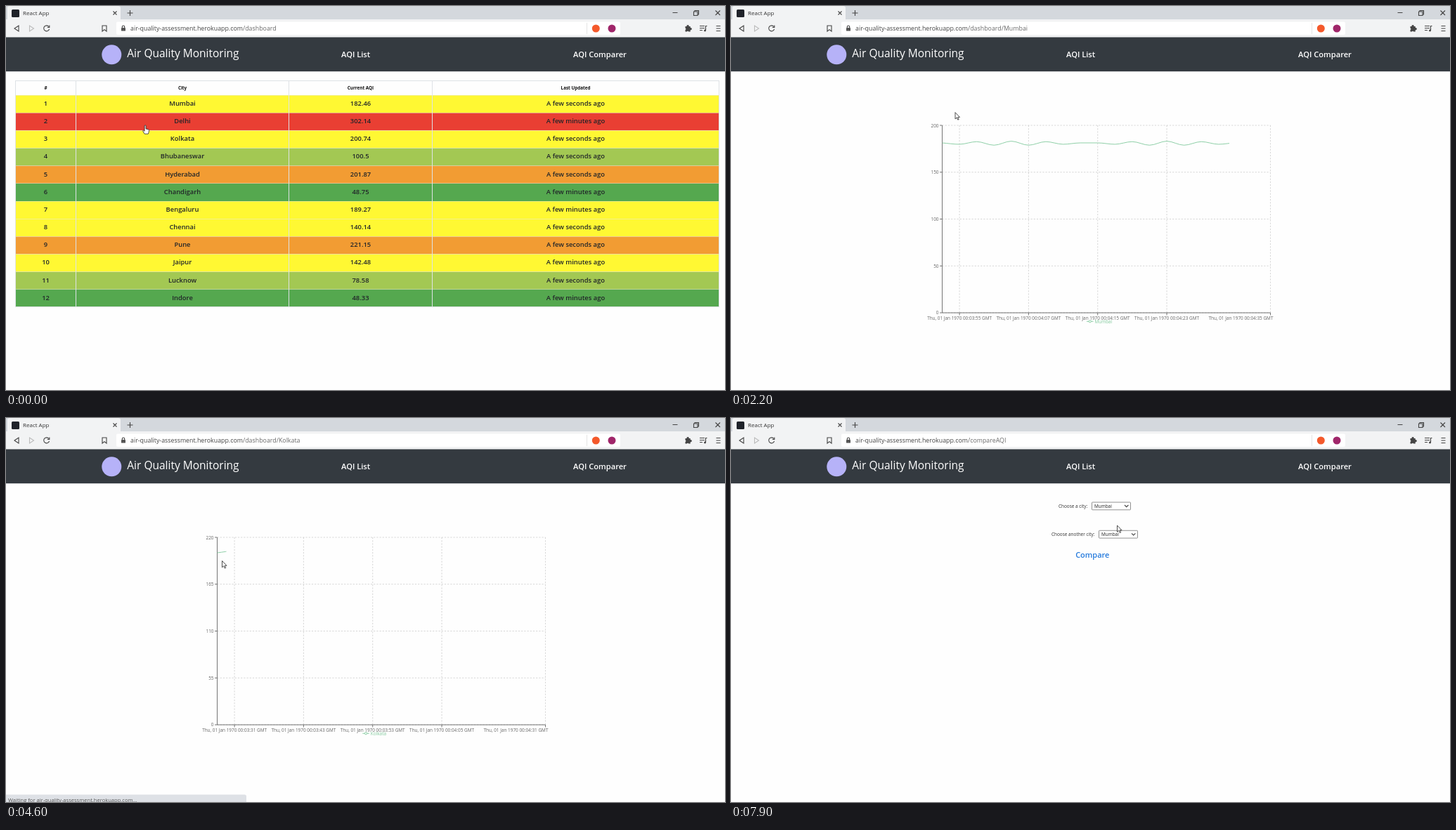
Recreate the animation shown at these times as an HTML page. Size 1023 by 547 pixels, loop 8 s.

```html
<!DOCTYPE html>
<html lang="en">
<head>
<meta charset="utf-8">
<title>Air Quality Monitoring</title>
<style>
html, body { margin: 0; width: 100%; height: 100%; overflow: hidden; background: #fefefe; }
svg { display: block; width: 1023px; height: 547px; font-family: "Open Sans", "Noto Sans", sans-serif; }
.icon { fill: none; stroke: #444; stroke-width: 1.1; }
.small { font-size: 6.42px; }
.mid { text-anchor: middle; }
.cell { font-size: 9.4px; font-weight: 600; fill: #212529; text-anchor: middle; }
.head { font-size: 6.3px; font-weight: 700; fill: #111; text-anchor: middle; }
.nav { font-size: 11.15px; font-weight: 600; fill: #fff; }
.border { fill: none; stroke: #dee2e6; shape-rendering: crispEdges; }
.rule { stroke: #dee2e6; stroke-opacity: .4; shape-rendering: crispEdges; }
.tick { fill: #666; }
.grid { stroke: #ccc; stroke-width: .8; stroke-dasharray: 2.2 2; }
.axis { stroke: #666; stroke-width: .9; }
.guide { stroke: #ccc; }
.series { fill: none; stroke: #82ca9d; stroke-width: .9; }
.dot { fill: #fff; stroke: #82ca9d; stroke-width: .9; }
.select { fill: #fff; stroke: #767676; stroke-width: .8; }
.pointer { fill: #fff; stroke: #222; stroke-width: .8; }
</style>
</head>
<body>
<svg viewBox="0 0 1023 547">
  <defs>
    <clipPath id="reveal"><rect id="sweep" x="300" y="160" width="0" height="290"/></clipPath>
  </defs>
  <rect width="1023" height="547" fill="#fefefe"/>

  <g id="browser">
    <rect width="1023" height="19.5" fill="#d4d8dd"/>
    <rect y="19" width="1023" height="26" fill="#f2f3f4"/>
    <path d="M2 20V3q0-3 3-3H160q3 0 3 3V20z" fill="#f2f3f4"/>
    <rect x="8" y="5" width="11" height="11" rx="1.5" fill="#20232a"/>
    <text x="24" y="13" font-size="8" fill="#333">React App</text>
    <path class="icon" d="M152.500 7.500l5 5m0-5l-5 5M172.500 10h8m-4-4v8"/>
    <path class="icon" d="M948.500 9.500h7M978.500 8h5.500v5.500h-5.500zM980 8V6.500h5.500V12H984M1009.500 6.500l6.500 6.500m0-6.500l-6.500 6.500"/>
    <path class="icon" d="M18 28v8l-6-4z"/>
    <path class="icon" d="M33.500 28v8l6-4z" style="stroke:#bbb"/>
    <path class="icon" d="M61 29.500a4 4 0 1 0 .6 3.400M61.800 27.500v3h-3"/>
    <path class="icon" d="M137 28h6v8l-3-2.400-3 2.400z"/>
    <rect x="157" y="22.500" width="717" height="18.500" rx="2" fill="#fff"/>
    <path d="M826.500 24v16" stroke="#ddd" stroke-width=".8"/>
    <rect x="164" y="31" width="6" height="4.500" rx=".6" fill="#555"/>
    <path class="icon" d="M165.300 31v-1.300a1.700 1.700 0 0 1 3.400 0V31"/>
    <text x="177" y="35" font-size="8.84" fill="#444">air-quality-assessment.herokuapp.com<tspan id="path" fill="#6a6a6a"></tspan></text>
    <circle cx="839.300" cy="32" r="5.500" fill="#f4592b"/>
    <circle cx="862" cy="32" r="5.500" fill="#a0266a"/>
    <path d="M966.500 29h2.200a1.500 1.500 0 1 1 2.800 0h2.200v2.200a1.500 1.500 0 1 1 0 2.800v2.500h-2.500a1.300 1.300 0 0 0-2.400 0h-2.300V34a1.400 1.400 0 0 0 0-2.600z" fill="#444"/>
    <path class="icon" d="M987 28.500h7M987 31.500h7M987 34.500h4M995.500 35v-6.500h2"/>
    <circle cx="994.500" cy="35" r="1.400" fill="#444"/>
    <path class="icon" d="M1010.500 28.500h6M1010.500 32h6M1010.500 35.500h6"/>
  </g>

  <rect y="44.500" width="1023" height="48.700" fill="#343a40"/>
  <circle cx="150.300" cy="69.300" r="14" fill="#b6b2f8"/>
  <text x="172.300" y="72.800" font-size="15.5" fill="#fff">Air Quality Monitoring</text>
  <text x="477" y="73" class="nav">AQI List</text>
  <text x="807" y="73" class="nav">AQI Comparer</text>

  <g id="pages"></g>

  <g id="status">
    <path d="M0 536.500H339.500q2.500 0 2.500 2.500V547H0z" fill="#dee1e6"/>
    <text id="statusText" x="3" y="546.800" font-size="7.57" fill="#555"></text>
  </g>
  <path id="arrow" class="pointer" d="M0 0V9.300L2.200 7.300 3.800 10.600 5.200 9.900 3.700 6.800H6.500z"/>
  <path id="hand" class="pointer" d="M-.9 1q0-1.200 1-1.200t1 1.200V5l3.300.8q1.200.4 1.100 1.700L5 10.200 4.300 12.200H-.8L-3 8.700q-.8-1.300.2-1.500.8-.1 1.900 1.200z"/>
</svg>

<script>
const LOOP = 8000, STEP = 100;
const HOST = "air-quality-assessment.herokuapp.com";
const $ = id => document.getElementById(id);

function add(parent, tag, attrs, text = "") {
  const el = document.createElementNS("http://www.w3.org/2000/svg", tag);
  for (const k in attrs) el.setAttribute(k, attrs[k]);
  el.textContent = text;
  parent.appendChild(el);
  return el;
}
const newPage = () => add($("pages"), "g");
const label = (parent, x, y, cls, text, extra) => add(parent, "text", { x, y, class: cls, ...extra }, text);
const line = (parent, x1, y1, x2, y2, cls) => add(parent, "line", { x1, y1, x2, y2, class: cls });
const show = (el, on) => el.setAttribute("visibility", on ? "visible" : "hidden");
const move = (el, x, y) => el.setAttribute("transform", `translate(${x} ${y})`);
const smooth = u => u * u * (3 - 2 * u);

// Interpolates rows of [position, ...values]
function along(points, x, shape = u => u) {
  const i = Math.max(1, points.findIndex(p => p[0] >= x));
  const [a, ...from] = points[i - 1], [b, ...to] = points[i];
  const u = shape((x - a) / (b - a));
  return from.map((v, j) => v + (to[j] - v) * u);
}

// Table: one reading, or the readings before and after the update
const readings = {
  Mumbai: [182.46, 180.16], Delhi: [302.14, 303.77], Kolkata: [200.74], Bhubaneswar: [100.5, 99.06],
  Hyderabad: [201.87, 199.16], Chandigarh: [48.75], Bengaluru: [189.27], Chennai: [140.14],
  Pune: [221.15, 219.64], Jaipur: [142.48], Lucknow: [78.58], Indore: [48.33]
};
const recent = ["Mumbai Kolkata Bhubaneswar Hyderabad Chennai Pune Lucknow", "Kolkata Hyderabad Chennai Lucknow"];
const edges = [13.5, 99.5, 402.5, 606.5, 1014.5];
const center = i => (edges[i] + edges[i + 1]) / 2;
const color = aqi => aqi < 51 ? "#55a84f" : aqi < 101 ? "#a3c853" : aqi < 201 ? "#fff833" : aqi < 301 ? "#f29c33" : "#e93f33";

function makeTable(version) {
  const g = newPage(), top = 127, height = 25.17;
  ["#", "City", "Current AQI", "Last Updated"].forEach((s, c) => label(g, center(c), 119, "head", s));
  Object.keys(readings).forEach((city, i) => {
    const y = top + i * height, aqi = readings[city][version] ?? readings[city][0];
    const unit = recent[version].includes(city) ? "seconds" : "minutes";
    add(g, "rect", { x: 13.5, y, width: 1001, height, fill: color(aqi) });
    [i + 1, city, aqi, `A few ${unit} ago`].forEach((s, c) => label(g, center(c), y + 14.9, "cell", s));
    line(g, 14, Math.floor(y) + .5, 1014, Math.floor(y) + .5, "rule");
  });
  add(g, "rect", { x: 13.5, y: 106.5, width: 1001, height: 322, class: "border" });
  for (const x of edges.slice(1, 4)) line(g, x, 107, x, 429, "border");
  return g;
}

// Charts
const X0 = 300.5, GAP = 24.58, TOP = 170, BASE = 437, LAST = 19;
const px = k => X0 + k * GAP;
const clock = s => `Thu, 01 Jan 1970 00:0${Math.floor(s / 60)}:${String(s % 60).padStart(2, "0")} GMT`;

// Monotone cubic through evenly spaced points
function curve(ys) {
  const d = ys.slice(1).map((y, i) => y - ys[i]);
  const slope = ys.map((_, i) => {
    const a = d[i - 1] ?? d[i], b = d[i] ?? a;
    return a * b <= 0 ? 0 : Math.sign(a) * Math.min(Math.abs(a) * 2, Math.abs(b) * 2, Math.abs(a + b) / 2);
  });
  return ys.reduce((p, y, i) => i === 0 ? `M${px(0)} ${y}` :
    p + `C${px(i - 2 / 3)} ${ys[i - 1] + slope[i - 1] / 3} ${px(i - 1 / 3)} ${y - slope[i] / 3} ${px(i)} ${y}`, "");
}

// Same curve as CSS "ease"
function ease(u) {
  if (u <= 0 || u >= 1) return u <= 0 ? 0 : 1;
  const bezier = (s, a, b) => 3 * s * (1 - s) * (a * (1 - s) + b * s) + s ** 3;
  let lo = 0, hi = 1;
  for (let i = 0; i < 24; i++) {
    const s = (lo + hi) / 2;
    if (bezier(s, .25, .25) < u) lo = s; else hi = s;
  }
  return bezier(lo, .1, 1);
}

function makeChart({ name, max, times, mean, swing, period, peak, start, legendX }) {
  const g = newPage();
  const values = Array.from({ length: LAST + 1 }, (_, k) => mean + swing * Math.cos(2 * Math.PI * (k - peak) / period));
  const ys = values.map(v => BASE - v * (BASE - TOP) / max);
  const timeLabel = k => clock(Math.round(along(times, k)[0]));
  for (let i = 0; i <= 4; i++) {
    const y = BASE - i * (BASE - TOP) / 4;
    line(g, X0, y, px(LAST), y, "grid");
    line(g, X0 - 3.5, y, X0, y, "axis");
    label(g, 295.5, y + (i === 4 ? 3.4 : 2.4), "small tick", max * i / 4, { "text-anchor": "end" });
  }
  for (const k of [1, 5, 9, 13, LAST]) {
    line(g, px(k), TOP, px(k), BASE, "grid");
    line(g, px(k), BASE, px(k), BASE + 3.5, "axis");
    label(g, Math.min(px(k), 725.5), 447, "small tick mid", timeLabel(k));
  }
  line(g, X0, TOP, X0, BASE, "axis");
  line(g, X0, BASE, px(LAST), BASE, "axis");
  line(g, legendX, 449.3, legendX + 9.5, 449.3, "series");
  add(g, "circle", { cx: legendX + 4.75, cy: 449.3, r: 1.6, class: "dot" });
  label(g, legendX + 11.5, 451.6, "small", name, { fill: "#82ca9d" });

  const guide = line(g, 0, TOP, 0, BASE, "guide");
  add(g, "path", { d: curve(ys), class: "series", "clip-path": "url(#reveal)" });
  const dots = add(g, "g");
  ys.forEach((y, k) => add(dots, "circle", { cx: px(k), cy: y, r: 2.1, class: "dot" }));
  const active = add(g, "circle", { r: 2.3, fill: "#82ca9d", stroke: "#fff", "stroke-width": .6 });
  const tip = add(g, "g");
  add(tip, "rect", { width: 106, height: 39, fill: "#fff", stroke: "#ccc", "stroke-width": .8 });
  const when = label(tip, 53, 14.8, "small mid", "", { fill: "#333" });
  const reading = label(tip, 53, 27.2, "small mid", "", { fill: "#82ca9d" });

  const nearest = t => Math.max(0, Math.min(LAST, Math.round((pointer(t)[0] - X0) / GAP)));
  function update(t) {
    const p = ease((t - start) / 750);
    $("sweep").setAttribute("width", p * 470);
    show(g, true);
    show(dots, p === 1);
    const [x, y] = pointer(t);
    const hover = t > start + STEP && x > X0 && x < px(LAST) && y > TOP && y < BASE;
    for (const el of [guide, active, tip]) show(el, hover);
    if (!hover) return;
    const k = nearest(t);
    move(guide, px(k), 0);
    move(active, px(k), ys[k]);
    move(tip, .74 * px(k) + .26 * px(nearest(t - STEP)) + 11.5, y + 19.8);
    when.textContent = timeLabel(k);
    reading.textContent = `${name} : ${values[k].toFixed(2)}`;
  }
  function hide() {
    for (const el of [g, dots, guide, active, tip]) show(el, false);
  }
  return { update, hide };
}

function makeCompare() {
  const g = newPage();
  const field = (text, x, boxX, y) => {
    label(g, x, y + 8, "small", text, { fill: "#333" });
    add(g, "rect", { x: boxX, y, width: 55, height: 10.8, rx: .8, class: "select" });
    label(g, boxX + 3.5, y + 8, "small", "Mumbai", { fill: "#222" });
    add(g, "path", { d: `M${boxX + 46.5} ${y + 4}l2.700 2.700 2.700-2.700`, class: "icon" });
  };
  field("Choose a city:", 466, 513.5, 120);
  field("Choose another city:", 456, 523.5, 160.3);
  label(g, 514.3, 199, "mid", "Compare", { fill: "#2379dc", "font-size": 11, "font-weight": 600 });
  return g;
}

// Pointer stops, with a smooth move between each pair
const stops = [
  [0, 198, 170], [800, 249, 135], [1700, 249, 135], [3200, 519, 199], [3500, 598, 200], [3900, 497, 69],
  [4400, 252, 187], [4600, 307.5, 203.5], [5700, 630, 200], [6000, 605.5, 198.5], [6500, 497, 70],
  [6700, 491, 103.5], [7300, 842, 70], [7700, 545, 125], [7800, 545, 125], [7900, 549.5, 153]
];
const pointer = t => along(stops, t, smooth);

// Time, page, path, status
const waiting = `Waiting for ${HOST}...`, link = path => `https://${HOST}${path}`;
const list = "/dashboard", compare = "/compareAQI";
const scenes = [
  [0, "before", list, ""],
  [500, "after", list, ""],
  [900, "after", list + "/Mumbai", waiting],
  [1500, "after", list + "/Mumbai", ""],
  [1800, "mumbai", list + "/Mumbai", ""],
  [3900, "after", list, link(list)],
  [4400, "after", list + "/Kolkata", waiting],
  [4600, "kolkata", list + "/Kolkata", waiting],
  [5100, "kolkata", list + "/Kolkata", ""],
  [6500, "after", list, link(list)],
  [7000, "after", list, ""],
  [7300, "after", list, link(compare)],
  [7400, "compare", compare, link(compare)],
  [7600, "compare", compare, ""]
];

const still = { before: makeTable(0), after: makeTable(1), compare: makeCompare() };
const charts = {
  mumbai: makeChart({
    name: "Mumbai", max: 200, start: 1766, legendX: 506,
    mean: 180.9, swing: 2.2, period: 2.25, peak: 4,
    times: [[0, 232], [1, 235], [5, 247], [LAST, 275]]
  }),
  kolkata: makeChart({
    name: "Kolkata", max: 220, start: 4566, legendX: 507.3,
    mean: 201.165, swing: 3, period: 4.7, peak: 1,
    times: [[0, 208], [5, 223], [9, 233], [12, 239], [13, 245], [LAST, 271]]
  })
};

function render(t) {
  const [, page, path, status] = scenes.findLast(s => s[0] <= t);
  for (const k in still) show(still[k], k === page);
  for (const k in charts) if (k === page) charts[k].update(t); else charts[k].hide();
  $("path").textContent = path;
  $("statusText").textContent = status;
  show($("status"), status);
  const [x, y] = pointer(t);
  const onRow = page in still && path === list && y > 127;
  const onLink = y > 60 && y < 80 && (x > 475 && x < 520 || x > 805 && x < 885);
  show($("hand"), onRow || onLink);
  show($("arrow"), !(onRow || onLink));
  move($("hand"), x, y);
  move($("arrow"), x, y);
}

function tick() {
  render(Math.min(Math.floor(performance.now() % LOOP / STEP) * STEP, LOOP - STEP));
  requestAnimationFrame(tick);
}
tick();
</script>
</body>
</html>
```
